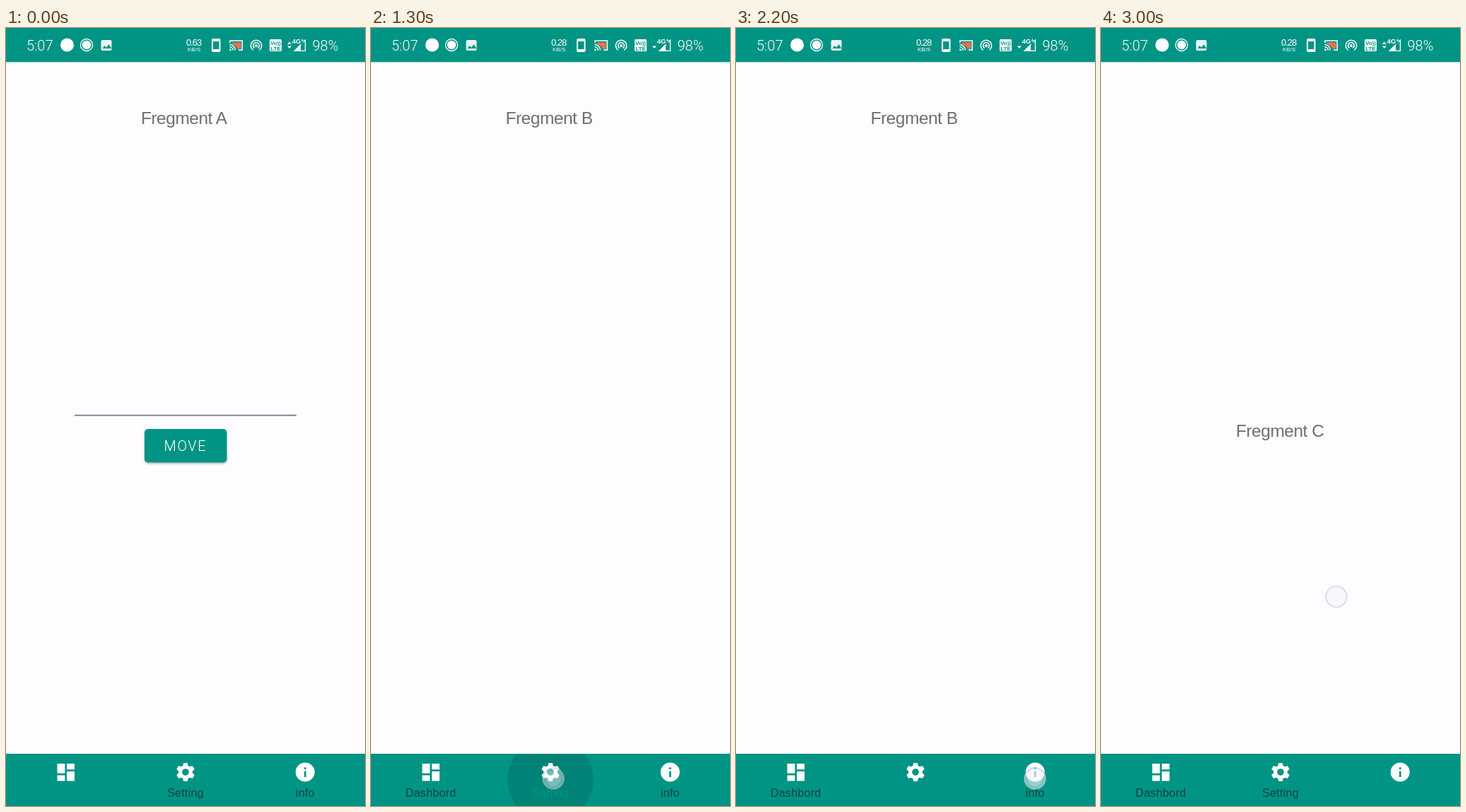
Write an HTML page that moves like this. It is 508 by 1102 pixels and loops after 3100 ms.

```html
<!DOCTYPE html>
<html lang="en">
<head>
<meta charset="utf-8">
<title>Bottom navigation</title>
<style>
  html, body { margin: 0; width: 100%; height: 100%; overflow: hidden; background: #fefcff; }
  svg { display: block; width: 508px; height: 1102px; }
  text { font-family: "Liberation Sans", Arial, sans-serif; }

  .teal { fill: #009485; }
  .white { fill: #fff; }
  .line { fill: none; stroke: #fff; }
  .title { font-size: 24.5px; letter-spacing: -.5px; fill: #706e72; }
  .status { font: 300 20px Roboto, "Liberation Sans", sans-serif; }
  .speed { font-size: 13px; letter-spacing: -1px; }
  .unit { font-size: 8px; }
  .move { font: 300 20px Roboto, "Liberation Sans", sans-serif; letter-spacing: 1.6px; }
  .label { font-size: 16px; letter-spacing: .3px; text-anchor: middle; fill: #07453e; }
  .ripple { transform-box: fill-box; transform-origin: center; }

  /* The screen refreshes every 100 ms, so every change is a hard step. */
  .pageA, .pageB, .pageC, .old, .new, .slide, .extra, .up,
  .home, .setting, .info, .ripple, .touch {
    animation: 3.1s step-end infinite;
  }
  .pageA { animation-name: pageA; }
  .pageB { animation-name: pageB; }
  .pageC { animation-name: pageC; }
  .old { animation-name: old; }
  .new { animation-name: new; }
  .slide { animation-name: slide; }
  .extra { animation-name: extra; }
  .up { animation-name: up; }
  .home { animation-name: home; }
  .setting { animation-name: setting; }
  .info { animation-name: info; }
  .ripple { animation-name: ripple; }
  .ripple.late { animation-delay: -2s; }
  .touch { animation-name: touch; }

  @keyframes pageA { 0% { opacity: 1 } 41.92%, 100% { opacity: 0 } }
  @keyframes pageB { 0% { opacity: 0 } 41.92% { opacity: 1 } 77.4%, 100% { opacity: 0 } }
  @keyframes pageC { 0% { opacity: 0 } 77.4%, 100% { opacity: 1 } }
  @keyframes old { 0% { opacity: 1 } 9.66%, 100% { opacity: 0 } }
  @keyframes new { 0% { opacity: 0 } 9.66%, 100% { opacity: 1 } }
  @keyframes slide {
    0% { transform: none }
    3.21% { transform: translateX(7px) }
    6.44% { transform: translateX(14px) }
    9.66% { transform: translateX(21px) }
    12.89% { transform: translateX(28px) }
    22.57% { transform: translateX(21px) }
    25.79% { transform: translateX(14px) }
    29.02% { transform: translateX(7px) }
    32.24%, 100% { transform: none }
  }
  @keyframes extra {
    0% { opacity: 0 }
    6.44% { opacity: .4 }
    9.66% { opacity: .7 }
    12.89% { opacity: 1 }
    22.57% { opacity: .6 }
    25.79% { opacity: .3 }
    29.02%, 100% { opacity: 0 }
  }
  @keyframes up { 0% { opacity: 1 } 38.69% { opacity: 0 } 80.63%, 100% { opacity: 1 } }
  @keyframes home { 0% { fill: #009485 } 41.92%, 100% { fill: #07453e } }
  @keyframes setting { 0% { fill: #07453e } 41.92% { fill: #009485 } 77.4%, 100% { fill: #07453e } }
  @keyframes info { 0% { fill: #07453e } 77.4%, 100% { fill: #009485 } }
  @keyframes ripple {
    0% { opacity: 0; transform: scale(.27) }
    38.69% { opacity: .11; transform: scale(.27) }
    41.92% { opacity: .11; transform: scale(.66) }
    45.14% { opacity: .11; transform: none }
    48.37% { opacity: .07; transform: none }
    51.6% { opacity: .025; transform: none }
    54.82%, 100% { opacity: 0; transform: none }
  }
  @keyframes touch {
    0% { opacity: 0; transform: translate(258px, 1063px) }
    38.69% { opacity: 1; transform: translate(258px, 1063px) }
    41.92% { opacity: .8; transform: translate(258px, 1063px) }
    45.14% { opacity: 0; transform: translate(423px, 1063px) }
    70.95% { opacity: 1; transform: translate(423px, 1063px) }
    77.4% { opacity: .8; transform: translate(423px, 1063px) }
    80.63% { opacity: 0; transform: translate(333px, 805.5px) }
    96.76%, 100% { opacity: .8; transform: translate(333px, 805.5px) }
  }
</style>
</head>
<body>
<svg viewBox="0 0 508 1102">
  <defs>
    <clipPath id="bar"><path d="M0 1028h508v74H0z"/></clipPath>
    <filter id="shadow" x="-10%" y="-20%" width="120%" height="150%">
      <feDropShadow dx="0" dy="1.5" stdDeviation="1.5" flood-opacity=".32"/>
    </filter>
    <g id="record">
      <circle class="line" r="8.5" stroke-width="1.3"/>
      <circle class="white" r="6.2"/>
    </g>
    <path id="tooth" d="M-1.7-9.2h3.4L2.4-6h-4.8z" fill="#fff" stroke="#fff" stroke-width=".8" stroke-linejoin="round"/>
  </defs>

  <rect width="508" height="1102" fill="#fefcff"/>

  <!-- pages -->
  <g class="pageA">
    <text class="title" x="191" y="136">Fregment A</text>
    <path d="M97 548.6h314" stroke="#7c7780" stroke-width="1.6"/>
    <rect class="teal" x="196" y="568" width="116.500" height="47.500" rx="5" filter="url(#shadow)"/>
    <text class="move white" x="223.500" y="599">MOVE</text>
  </g>
  <text class="title pageB" x="190.500" y="136">Fregment B</text>
  <text class="title pageC" x="191" y="579">Fregment C</text>

  <!-- status bar -->
  <rect class="teal" width="508" height="48.300"/>
  <text class="status white" x="29" y="31.500">5:07</text>
  <circle class="white" cx="86.500" cy="24" r="9.500"/>
  <g class="slide">
    <g class="extra"><use href="#record" x="114" y="24"/></g>
    <rect x="134.500" y="17" width="15" height="15" rx="2" fill="#e9f6f4"/>
    <path class="teal" d="M136.500 29l3-4 2.500 2.800 3.300-4.600 4.200 5.800z"/>
  </g>
  <use href="#record" x="114" y="24"/>

  <g class="white">
    <text class="speed old" x="255" y="25">0.63</text>
    <text class="speed new" x="255" y="25">0.28</text>
    <text class="unit" x="257" y="32.500">KB/S</text>
    <path fill-rule="evenodd" d="M293 15h8.500q2 0 2 2v15q0 2-2 2H293q-2 0-2-2V17q0-2 2-2zm0 4v11h8.500V19z"/>
  </g>

  <!-- cast -->
  <path d="M320 20.500h12.500v9H328q-2-5-8-6z" fill="#f0704a"/>
  <g class="line" stroke-width="1.500">
    <path d="M317 21v-3h17.300v13.300H329"/>
    <path d="M316.500 23.600a8 8 0 0 1 8 8M316.500 26.700a5 5 0 0 1 5 5"/>
  </g>
  <path class="white" d="M316.300 29.300a2.700 2.700 0 0 1 2.700 2.700h-2.700z"/>

  <!-- hotspot -->
  <g class="line" stroke-width="1.600">
    <path d="M349.700 31.300a7.700 7.700 0 1 1 8.600 0"/>
    <path d="M351.700 28.400a4.300 4.300 0 1 1 4.600 0"/>
  </g>
  <circle class="white" cx="354" cy="25" r="2"/>

  <rect class="white" x="373" y="16" width="17" height="17" rx="1.500"/>
  <g class="teal" font-size="8" font-weight="700" text-anchor="middle">
    <text x="381.500" y="24">Vo))</text>
    <text x="381.500" y="31.800">LTE</text>
  </g>

  <!-- mobile signal -->
  <path class="white up" d="M398 23h6l-3-3.500z"/>
  <path class="white" d="M398 25.500h6l-3 3.500z"/>
  <path class="line" d="M423.500 17.200v15.100h-15z" stroke-width="1.300"/>
  <path class="white" d="M407 33l10-10.200V33z"/>
  <rect class="teal" x="404" y="14" width="16.500" height="9.200"/>
  <text class="white" x="404.800" y="22" font-size="9.500" font-weight="700">4G<tspan dy="-2" font-size="7">+</tspan></text>
  <text class="status white" x="433.500" y="31.500">98%</text>

  <!-- navigation bar -->
  <rect class="teal" y="1028" width="508" height="74"/>
  <g clip-path="url(#bar)">
    <circle class="ripple" cx="254" cy="1065" r="92"/>
    <circle class="ripple late" cx="423" cy="1065" r="92"/>
  </g>
  <path class="white" transform="translate(68.400 1038) scale(1.36)"
    d="M3 13h8V3H3zm0 8h8v-6H3zm10 0h8V11h-8zm0-18v6h8V3z"/>
  <g transform="translate(254 1054) scale(1.36)">
    <circle class="line" r="5.400" stroke-width="3.700"/>
    <use href="#tooth"/>
    <use href="#tooth" transform="rotate(60)"/>
    <use href="#tooth" transform="rotate(120)"/>
    <use href="#tooth" transform="rotate(180)"/>
    <use href="#tooth" transform="rotate(240)"/>
    <use href="#tooth" transform="rotate(300)"/>
  </g>
  <circle class="white" cx="423.300" cy="1054" r="13.500"/>
  <path class="teal" d="M422 1047.300h2.700v2.700H422zm0 5.400h2.700v8.200H422z"/>
  <text class="label home" x="84.700" y="1089">Dashbord</text>
  <text class="label setting" x="254" y="1089">Setting</text>
  <text class="label info" x="423.300" y="1089">info</text>

  <!-- finger -->
  <g class="touch">
    <circle r="15" fill="#eef1f7" fill-opacity=".5"/>
    <circle r="11" fill="#fefcff" fill-opacity=".25"/>
    <circle r="14.800" fill="none" stroke="#bcc6da" stroke-opacity=".75" stroke-width="1.800"/>
  </g>
</svg>
</body>
</html>
```
